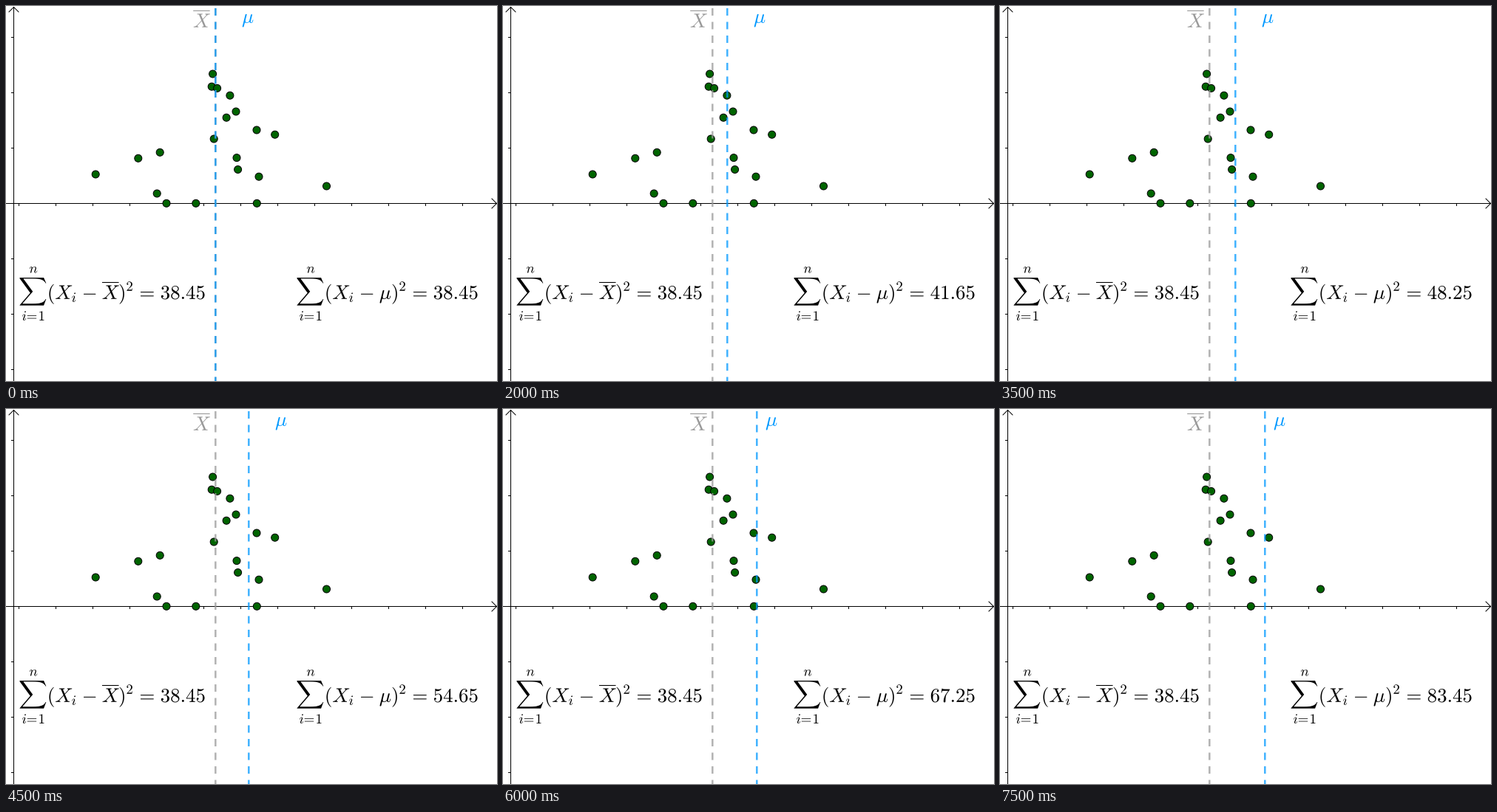
Write a matplotlib script that moves like this. It is 664 by 508 pixels and loops after 8 s.

```python
import matplotlib.pyplot as plt
from matplotlib.animation import FuncAnimation
from matplotlib.patches import Circle, PathPatch
from matplotlib.textpath import TextPath
from matplotlib.transforms import Affine2D

W, H, DPI = 664, 508, 100
STEPS, STEP_MS = 16, 500
EM = 26.9
SMALL = 0.7 * EM
GRAY, BLUE, GREEN = "#999999", "#0099ff", "#006400"
MEAN_X, AXIS_X, AXIS_Y = 283.3, 10.5, 267.5
BASE = 397
MIN_SUM = 38.45

POINTS = [
    (121.2, 228), (178.8, 206.3), (208.2, 198.3), (204.2, 254), (217, 267.3),
    (256.8, 267.3), (281.2, 180), (278.2, 109.2), (279.6, 92), (285.6, 111.4),
    (302.9, 121.2), (311, 143), (298.1, 151.2), (339, 168), (363.7, 174.2),
    (312, 205.6), (313.6, 221.5), (342, 231.2), (433.5, 244), (339.3, 267.3),
]

plt.rcParams["mathtext.fontset"] = "cm"
fig = plt.figure(figsize=(W / DPI, H / DPI), dpi=DPI, facecolor="white")
ax = fig.add_axes([0, 0, 1, 1])
ax.set_xlim(0, W)
ax.set_ylim(H, 0)
ax.axis("off")


def px(width):
    return width * 72 / DPI


def math_path(tex, x, y, size=EM, ink=True, top=False):
    """Outline of a formula; ink aligns its left edge, top its upper edge."""
    path = TextPath((0, 0), f"${tex}$", size=size)
    box = path.get_extents()
    dx = -box.x0 if ink else 0
    dy = -box.y1 if top else 0
    move = Affine2D().translate(dx, dy).scale(1, -1).translate(x, y)
    return path.transformed(move)


def write(tex, x, y, size=EM, color="black", **kw):
    patch = PathPatch(math_path(tex, x, y, size, **kw), fc=color, lw=0,
                      zorder=6, snap=False)
    return ax.add_patch(patch)


def stroke(xs, ys, width=1, color="black", **kw):
    return ax.plot(xs, ys, color=color, lw=px(width), snap=False, **kw)[0]


def dashed(x, color, z):
    return stroke([x, x], [3, H + 4], 2.5, color, alpha=0.75, zorder=z,
                  dashes=(4, 3.4), dash_capstyle="butt")


def bar_x(x, y, color):
    write("X", x, y, color=color)
    stroke([x - 0.5, x + 22], [y - 22.5] * 2, 1.1, color, zorder=6,
           solid_capstyle="butt")


def sum_of_squares(x0, center, value):
    """Sum formula starting at x0; returns the patch of its number."""
    write(r"\sum", x0 + 1.5, 368, top=True)
    write("n", x0 + 15, 361.5, SMALL)
    write("i", x0 + 5, 426, SMALL)
    write("=", x0 + 11.7, 426, SMALL)
    write("1", x0 + 28.2, 426, SMALL)
    write("(", x0 + 1.54 * EM, BASE)
    write("X", x0 + 1.86 * EM, BASE)
    write("i", x0 + 2.68 * EM, BASE + 4, SMALL)
    write("-", x0 + 3.27 * EM, BASE)
    if center == "mean":
        bar_x(x0 + 4.22 * EM, BASE, "black")
        end = x0 + 5.02 * EM
    else:
        write(r"\mu", x0 + 4.22 * EM, BASE)
        end = x0 + 4.796 * EM
    write(")", end + 0.056 * EM, BASE)
    write("2", end + 0.42 * EM, BASE - 0.413 * EM, SMALL)
    write("=", end + 1.11 * EM, BASE)
    x = end + 2.106 * EM
    return x, write(f"{value:.2f}", x, BASE, ink=False)


# Axes, arrowheads and ticks
stroke([0, W], [AXIS_Y] * 2)
stroke([AXIS_X] * 2, [1.5, H])
stroke([W - 7, W - 0.5, W - 7], [AXIS_Y - 6.5, AXIS_Y, AXIS_Y + 6.5])
stroke([AXIS_X - 6.5, AXIS_X, AXIS_X + 6.5], [8, 1.5, 8])
for tx in range(17, 618, 50):
    stroke([tx + 0.5] * 2, [AXIS_Y, AXIS_Y + 3])
for ty in range(42, H, 75):
    stroke([AXIS_X - 3, AXIS_X], [ty + 0.5] * 2)

for x, y in POINTS:
    ax.add_patch(Circle((x, y), 5, fc=GREEN, ec="black", lw=px(1),
                        zorder=3, snap=False))

dashed(MEAN_X, GRAY, 4)
bar_x(253.7, 29, GRAY)
sum_of_squares(17, "mean", MIN_SUM)

mu_line = dashed(MEAN_X, BLUE, 5)
mu_label = write(r"\mu", 0, 0, color=BLUE)
num_x, number = sum_of_squares(392, "mu", MIN_SUM)


def update(k):
    x = MEAN_X + 5 * k
    mu_line.set_xdata([x, x])
    # The label moves closer once the line passes the middle of the stage
    gap = 36.4 if x < W / 2 else 12.4
    mu_label.set_path(math_path(r"\mu", x + gap, 23))
    number.set_path(math_path(f"{MIN_SUM + 0.2 * k * k:.2f}", num_x, BASE, ink=False))
    return mu_line, mu_label, number


anim = FuncAnimation(fig, update, frames=STEPS, interval=STEP_MS, repeat=True)
plt.show()
```
